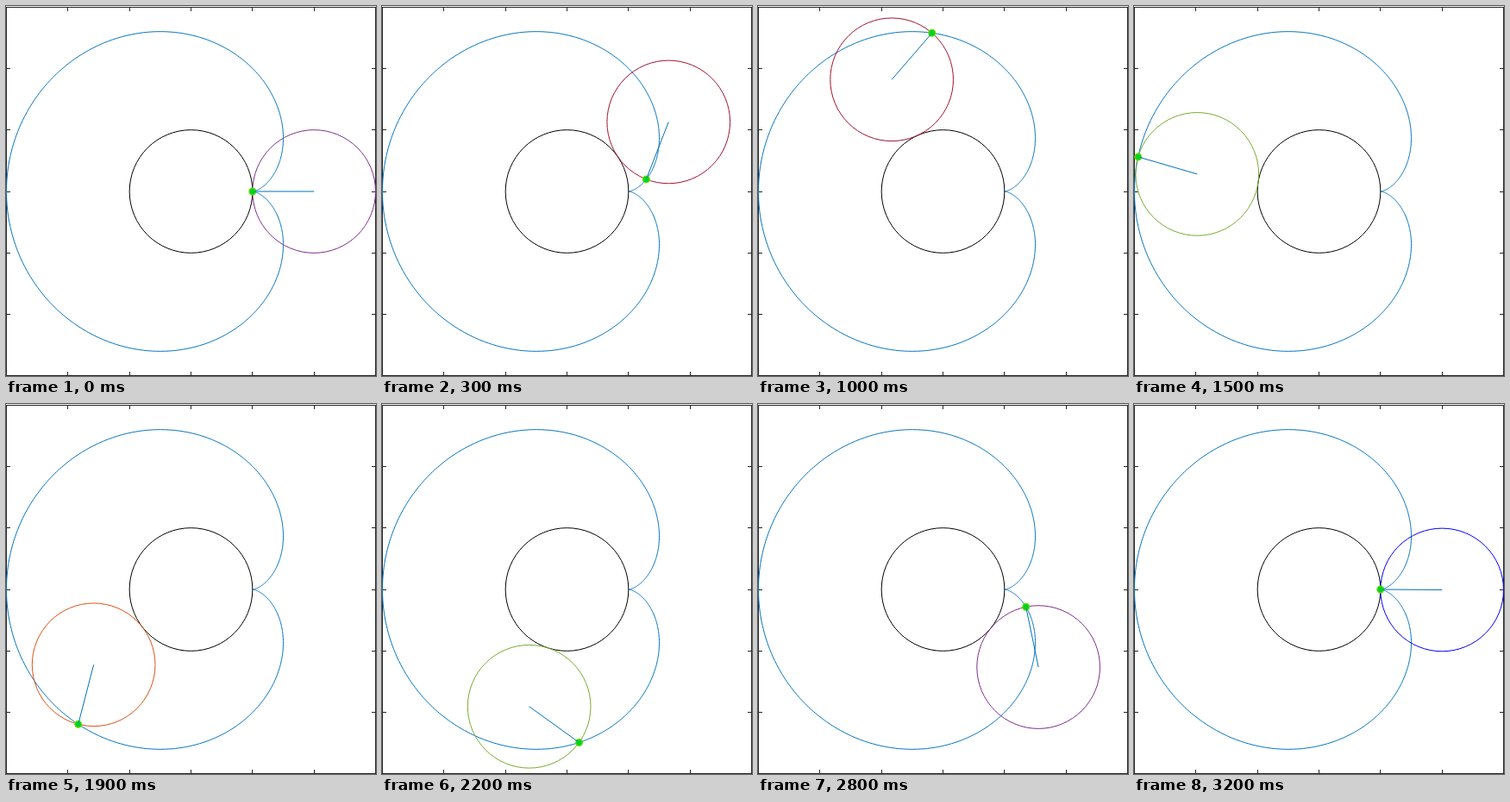
An HTML page with a canvas for the animation above (3300 ms loop, 429x429 px).

```html
<!DOCTYPE html>
<html>
<head>
<meta charset="utf-8">
<title>Cardioid from a rolling circle</title>
<style>
html, body { margin: 0; width: 100%; height: 100%; overflow: hidden; background: #fff; }
canvas { display: block; }
</style>
</head>
<body>
<canvas id="stage" width="429" height="429"></canvas>
<script>
const ctx = document.getElementById('stage').getContext('2d');
const SIZE = 429, CX = 214.5, CY = 215, R = 214 / 3, TAU = 2 * Math.PI;
const STEP_MS = 100, STEPS = 33;
const BLUE = '#0072bd';
const COLORS = [BLUE, '#d95319', '#edb120', '#7e2f8e', '#77ac30', '#4dbeee', '#a2142f'];

// Plot units to pixels, y pointing up
const px = (x, y) => [CX + R * x, CY - R * y];
const cardioid = a => px(2 * Math.cos(a) - Math.cos(2 * a), 2 * Math.sin(a) - Math.sin(2 * a));

function stroke(color, trace) {
  ctx.beginPath();
  trace();
  ctx.strokeStyle = color;
  ctx.lineWidth = 1;
  ctx.stroke();
}

function disc([x, y], r, color) {
  ctx.beginPath();
  ctx.arc(x, y, r, 0, TAU);
  ctx.fillStyle = color;
  ctx.fill();
}

function circle([x, y], color) {
  stroke(color, () => ctx.arc(x, y, R, 0, TAU));
}

function axes() {
  ctx.fillStyle = '#262626';
  ctx.fillRect(0, 1, SIZE, 1);
  ctx.fillRect(0, 428, SIZE, 1);
  ctx.fillRect(0, 1, 1, 428);
  ctx.fillRect(428, 1, 1, 428);
  for (let i = -2; i <= 2; i++) {
    const [x, y] = px(i, i).map(Math.floor);
    ctx.fillRect(x, 1, 1, 5);
    ctx.fillRect(x, 424, 1, 5);
    ctx.fillRect(0, y, 5, 1);
    ctx.fillRect(424, y, 5, 1);
  }
}

function draw(step) {
  const last = step === STEPS - 1;
  const angle = last ? 6.28 : step * 0.2;
  const hub = px(2 * Math.cos(angle), 2 * Math.sin(angle));
  const pen = cardioid(angle);

  ctx.fillStyle = '#fff';
  ctx.fillRect(0, 0, SIZE, SIZE);
  axes();
  stroke(BLUE, () => {
    for (let i = 0; i <= 628; i++) ctx.lineTo(...cardioid(i / 628 * TAU));
  });
  circle([CX, CY], '#000');
  circle(hub, last ? '#00f' : COLORS[(step + 3) % 7]);
  disc(pen, 4.5, '#62dc00');
  disc(pen, 3.2, '#00dc1e');
  stroke(BLUE, () => {
    ctx.moveTo(...hub);
    ctx.lineTo(...pen);
  });
  disc(pen, 2.5, '#00d028');
}

const start = performance.now();
function tick() {
  const t = performance.now() - start;
  draw(Math.floor(t / STEP_MS) % STEPS);
  requestAnimationFrame(tick);
}
tick();
</script>
</body>
</html>
```
